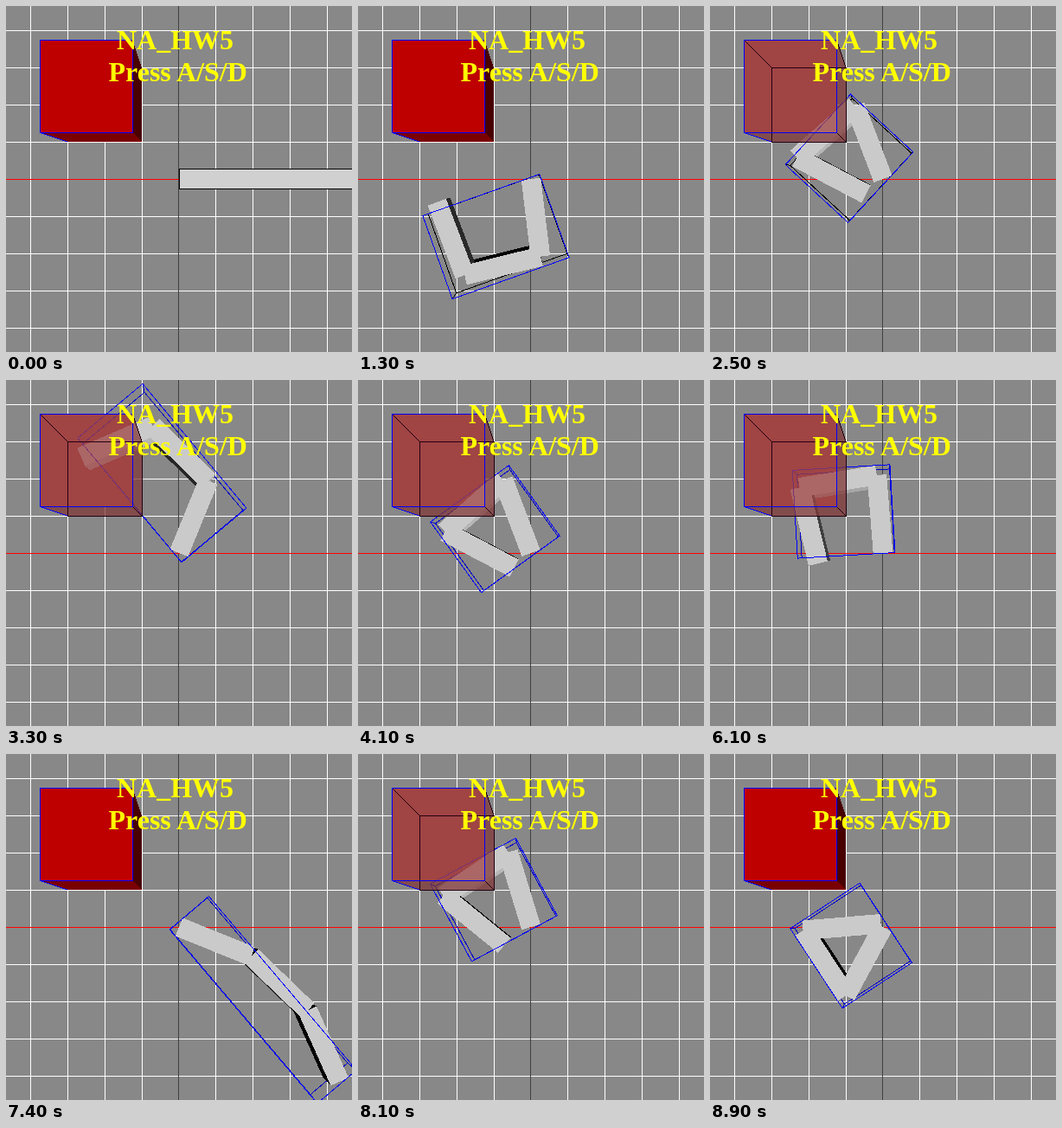
Recreate the animation shown at these times as an HTML page. Size 400x400 px, loop 9700 ms.

```html
<!DOCTYPE html>
<html lang="en">
<head>
<meta charset="utf-8">
<title>Arm and bounding box</title>
<style>
  html, body { margin: 0; width: 100%; height: 100%; overflow: hidden; background: #888; }
  svg { display: block; width: 100vw; height: 100vh; }
  text { font: bold 32px "Liberation Serif", "Times New Roman", serif; fill: #ff0; }
</style>
</head>
<body>
<svg viewBox="0 0 400 400">
  <g shape-rendering="crispEdges">
    <g id="grid"></g>
    <g id="scene"></g>
  </g>
  <text x="128" y="50">NA_HW5</text>
  <text x="118.5" y="87">Press A/S/D</text>
</svg>
<script>
const LOOP = 9700, STEP = 0.05;       // ms, radians per tick
const FOCAL = 200 / Math.tan(25 * Math.PI / 180), EYE = 10;
const LEN = 2, HALF = 0.25, TOP = 0.5;
const CUBE = { x0: -3, x1: -1, y0: 1, y1: 3, h: 2 };

// joint angle in ticks over time
const KEYS = [[0, 0], [800, 0], [900, -4], [1000, -10], [1200, -22], [1300, -29],
  [1400, -37], [1500, -47], [1700, -57], [1900, -68], [2000, -70], [2200, -70],
  [2300, -74], [2500, -87], [2600, -90], [2700, -90], [3200, -104], [3700, -95],
  [4100, -87], [4700, -54], [5300, -20], [6100, 33], [7400, 118], [8700, 201],
  [8800, 207], [8900, 210], [9700, 210]];

const scene = document.getElementById('scene');

function ticks(t) {
  const i = KEYS.findIndex(k => k[0] >= t);
  if (i < 1) return i ? KEYS[KEYS.length - 1][1] : 0;
  const [t0, a] = KEYS[i - 1], [t1, b] = KEYS[i];
  return Math.round(a + (b - a) * (t - t0) / (t1 - t0));
}

function project([x, y], z) {
  const s = FOCAL / (EYE - z);
  return (200 + x * s).toFixed(2) + ',' + (200 - y * s).toFixed(2);
}
const path = (pts, z) => 'M' + pts.map(p => project(p, z)).join('L') + 'Z';
const fill = (d, color, alpha = 1) => `<path d="${d}" fill="${color}" fill-opacity="${alpha}"/>`;
const line = (d, color) => `<path d="${d}" fill="none" stroke="${color}"/>`;
const wall = (a, b, z) => 'M' + [project(a, 0), project(b, 0), project(b, z), project(a, z)].join('L') + 'Z';
const post = (p, z) => 'M' + project(p, 0) + 'L' + project(p, z);
const dot = (p, q) => p[0] * q[0] + p[1] * q[1];

// corners of the three links, counter-clockwise
function links(angle) {
  let x = 0, y = 0;
  return [1, 2, 3].map(n => {
    const c = Math.cos(angle * n), s = Math.sin(angle * n);
    const at = (u, v) => [x + u * c - v * s, y + u * s + v * c];
    const quad = [at(0, -HALF), at(LEN, -HALF), at(LEN, HALF), at(0, HALF)];
    [x, y] = at(LEN, 0);
    return quad;
  });
}

function range(pts, axis) {
  const v = pts.map(p => dot(p, axis));
  return [Math.min(...v), Math.max(...v)];
}

// oriented box: principal axes follow the middle link
function bounds(angle) {
  const c = Math.cos(2 * angle), s = Math.sin(2 * angle);
  const u = [c, s], v = [-s, c], pts = links(angle).flat();
  const [a, b] = range(pts, u), [d, e] = range(pts, v);
  const at = (p, q) => [p * c - q * s, p * s + q * c];
  return { axes: [u, v], pts: [at(a, d), at(b, d), at(b, e), at(a, e)] };
}

const { x0, x1, y0, y1, h } = CUBE;
const cubePts = [[x0, y0], [x1, y0], [x1, y1], [x0, y1]];

function hits(box) {
  return [[1, 0], [0, 1], ...box.axes].every(axis => {
    const [a, b] = range(box.pts, axis), [c, d] = range(cubePts, axis);
    return a <= d && c <= b;
  });
}

function armSides(quads) {
  let out = '';
  for (const q of quads) q.forEach((a, i) => {
    const b = q[(i + 1) % 4];
    const len = Math.hypot(b[0] - a[0], b[1] - a[1]);
    const n = [(b[1] - a[1]) / len, (a[0] - b[0]) / len];
    if (dot(n, a) >= 0) return;
    const g = Math.round(255 * Math.max(0, 0.4 * n[0] - 0.6 * n[1]));
    out += fill(wall(a, b, TOP), `rgb(${g},${g},${g})`);
  });
  return out;
}

function cubeFaces() {
  return fill(wall(cubePts[0], cubePts[1], h), '#7a0000') +
    fill(wall(cubePts[1], cubePts[2], h), '#480000') +
    fill(path(cubePts, h), '#be0000');
}

function cubeGlass() {
  return fill(path(cubePts, h), '#a04444', 0.75) +
    fill(wall(cubePts[0], cubePts[1], h), '#803838', 0.75) +
    fill(wall(cubePts[1], cubePts[2], h), '#803838', 0.75) +
    line(path(cubePts, 0), '#200010') +
    cubePts.map(p => line(post(p, h), '#200010')).join('');
}

function draw(time) {
  const t = Math.floor(time % LOOP / 100) * 100;
  const k = ticks(t), moving = k !== ticks(t + 100);
  // while turning, the box trails the arm by one tick
  const lag = moving && t > 0 ? Math.sign(k - ticks(t - 100)) : 0;
  const quads = links(k * STEP), box = bounds((k - lag) * STEP);
  const hit = hits(box);
  const edge = k ? '#00f' : '#000', low = t < 2700 ? '#000' : '#0000c8';

  let out = hit ? fill(path(cubePts, h), '#a04444') : cubeFaces();
  out += line(path(box.pts, 0), low);
  out += box.pts.map(p => line(post(p, TOP), low)).join('');
  out += armSides(quads);
  out += quads.map(q => fill(path(q, TOP), k ? '#cacaca' : '#d0d0d0')).join('');
  out += line(path(box.pts, TOP), edge);
  if (hit) out += cubeGlass();
  out += line(post(cubePts[0], h), '#00f') + line(path(cubePts, h), '#00f');
  scene.innerHTML = out;
}

function drawGrid() {
  let out = '';
  const row = (y, c) => out += `<rect x="0" y="${y}" width="400" height="1" fill="${c}"/>`;
  const col = (x, c) => out += `<rect x="${x}" y="0" width="1" height="400" fill="${c}"/>`;
  for (let i = -4; i <= 4; i++) {
    if (!i) continue;
    const p = 200 + i * FOCAL / EYE;
    row(Math.round(p), '#fff');
    col(Math.floor(p), '#fff');
  }
  col(199, '#404040');
  row(200, '#f00');
  document.getElementById('grid').innerHTML = out;
}

drawGrid();
const start = performance.now();
function loop() {
  draw(performance.now() - start);
  requestAnimationFrame(loop);
}
loop();
</script>
</body>
</html>
```
